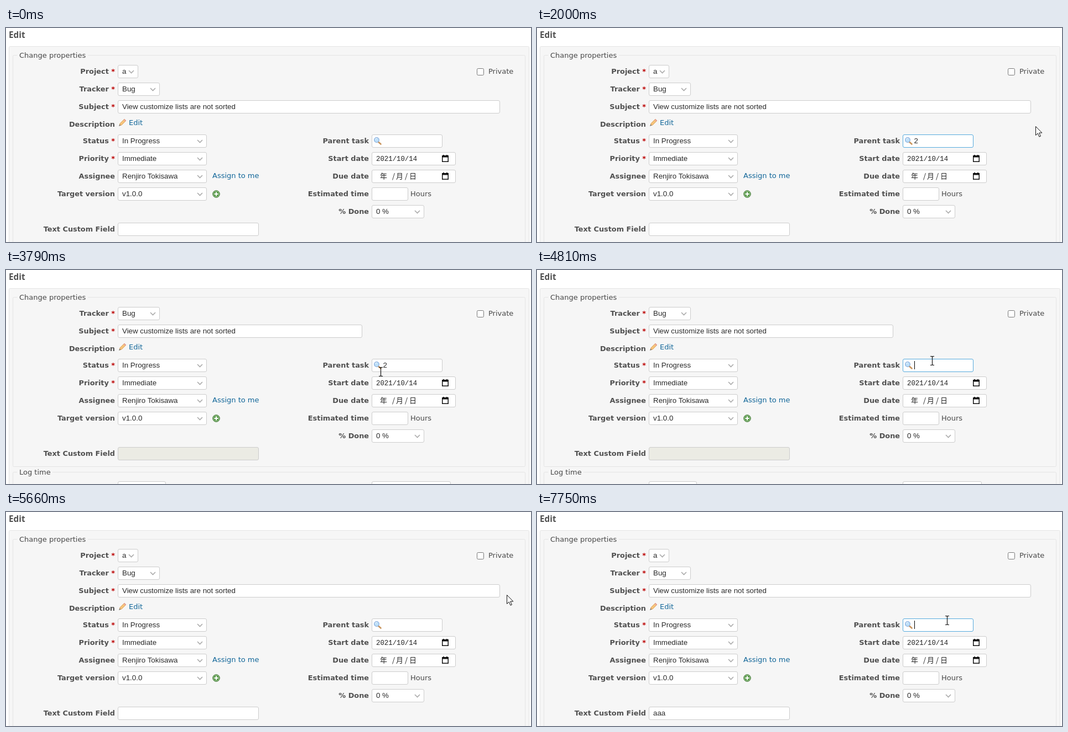
Recreate the animation shown at these times as an HTML page. Size 949 by 388 pixels, loop 8 s.

```html
<!DOCTYPE html>
<html lang="en">
<head>
<meta charset="utf-8">
<title>Edit form</title>
<style>
  html, body { margin: 0; width: 100%; height: 100%; overflow: hidden; background: #fff; }
  svg { display: block; }
  text { font: 13px "DejaVu Sans", sans-serif; fill: #484848; }
  .label { font-weight: bold; font-size: 12.85px; fill: #505050; }
  .end { text-anchor: end; }
  .req { fill: #b00; }
  .link { fill: #169; }
  .value { font: 13.33px "Liberation Sans", Arial, sans-serif; fill: #2b2b2b; }
  .date { font: 12.35px "Liberation Mono", monospace; fill: #222; }
  .kanji { font: 13px "Noto Sans CJK JP", "Noto Sans CJK", sans-serif; fill: #222; }
  .heading { font: bold 15.3px "Open Sans", sans-serif; fill: #505050; }
  .field { fill: #fff; stroke: #ccc; }
  .focus { stroke: #5ad; }
  .disabled { fill: #ebebe4; }
  .frame { fill: none; stroke: #e4e4e4; }
</style>
</head>
<body>
<svg id="stage" width="949" height="388" viewBox="0 0 949 388"></svg>
<script>
const TICK = 77.5, LOOP = 8000, SHIFT = 32;
const stage = document.getElementById('stage');

const text = (x, y, s, cls = '', id = '') => `<text id="${id}" x="${x}" y="${y}" class="${cls}">${s}</text>`;
const label = (right, y, s, required) =>
  text(right, y, s + (required ? ' <tspan class="req">*</tspan>' : ''), 'label end');
const field = (x, y, w, id = '') =>
  `<rect id="${id}" class="field" x="${x + .5}" y="${y + .5}" width="${w - 1}" height="23" rx="2.5"/>`;
const select = (x, y, w, value) => field(x, y, w) + text(x + 8, y + 16, value, 'value') +
  `<path d="M${x + w - 17} ${y + 10}l4.5 4.5 4.5-4.5" fill="none" stroke="#aaa" stroke-width="1.6"/>`;
const legend = (y, w, s) => `<rect x="20" y="${y - 8}" width="${w}" height="16" fill="#f6f6f6"/>` + text(24, y + 5, s);
const calendar = y => `<path d="M788.75 ${y + 7}h10.5v10.2h-10.5z" fill="none" stroke="#111" stroke-width="1.5"/>
  <path d="M788 ${y + 6}h12v3.5h-12zM790 ${y + 5}h2v2h-2zM796 ${y + 5}h2v2h-2z" fill="#111"/>`;

const pencil = `<path d="M205 177l1-4 8-8 3 3-8 8z" fill="#f6c47c" stroke="#d99a50" stroke-width=".8"/>
  <path d="M212.5 166.500l1.500-1.500 3 3-1.500 1.500z" fill="#e9a3a0"/><path d="M204 178l1.500-3.500 2 2z" fill="#777"/>`;
const plus = `<circle cx="380" cy="301" r="6.300" fill="#5a9a4c" stroke="#4c7c42"/>
  <circle cx="380" cy="301" r="5.200" fill="none" stroke="#a5cc98" stroke-width=".8"/>
  <path d="M376.500 301h7M380 297.500v7" stroke="#fff" stroke-width="2"/>`;
const lens = `<path d="M673 206.500l4.500 4" stroke="#c8945c" stroke-width="2.600" stroke-linecap="round"/>
  <circle cx="670" cy="203" r="4.300" fill="#bfe0f8" stroke="#88aede" stroke-width="1.300"/>
  <path d="M667.500 202a3 3 0 0 1 3-2" stroke="#fff" fill="none"/>`;
const spinner = Array.from({ length: 10 }, (_, i) =>
  `<path d="M575 220v-3.500" transform="rotate(${i * 36} 575 223)" stroke="#222" stroke-width="1.800" opacity="${1 - i * .08}"/>`).join('');

stage.innerHTML = `
  <rect x="5.5" y="33.5" width="940" height="400" rx="2" fill="#f6f6f6" stroke="#e4e4e4"/>
  ${text(5, 18, 'Edit', 'heading')}
  <rect id="properties" class="frame" x="12.5" y="49.5" width="926" rx="2"/>
  ${legend(49, 128, 'Change properties')}
  <rect x="851.5" y="73.500" width="12" height="12" rx="2" fill="#fff" stroke="#767676"/>
  ${text(872, 83, 'Private')}
  <g id="project">${label(197, 83, 'Project', true)}${select(202, 67, 37, 'a')}</g>
  <g id="rows">
    ${label(197, 115, 'Tracker', true)}${select(202, 99, 76, 'Bug')}
    ${label(197, 147, 'Subject', true)}${field(202, 131, 691, 'subject')}
    ${text(210, 147, 'View customize lists are not sorted', 'value')}
    ${label(197, 179, 'Description')}${pencil}${text(222, 176, 'Edit', 'link')}
    ${label(197, 209, 'Status', true)}${select(202, 193, 161, 'In Progress')}
    ${label(197, 241, 'Priority', true)}${select(202, 225, 161, 'Immediate')}
    ${label(197, 273, 'Assignee')}${select(202, 257, 161, 'Renjiro Tokisawa')}
    ${text(373, 272, 'Assign to me', 'link')}
    ${label(197, 305, 'Target version')}${select(202, 289, 161, 'v1.0.0')}${plus}
    ${label(197, 369, 'Text Custom Field')}${field(202, 353, 255, 'custom')}
    ${text(210, 369, '', 'value', 'customValue')}
    ${label(656, 209, 'Parent task')}${field(661, 193, 128, 'parent')}${lens}
    <rect id="selection" x="682" y="197" width="7.400" height="16" fill="#0078d7"/>
    ${text(681.5, 209, '', 'value', 'parentValue')}
    ${label(656, 241, 'Start date')}${field(661, 225, 152)}${text(669, 241, '2021/10/14', 'date')}${calendar(225)}
    ${label(656, 273, 'Due date')}${field(661, 257, 152)}${calendar(257)}
    ${[[676, '年'], [698, '/'], [705, '月'], [721, '/'], [729, '日']].map(([x, s]) => text(x, 273, s, 'kanji')).join('')}
    ${label(656, 305, 'Estimated time')}${field(661, 289, 66)}${text(731, 305, 'Hours')}
    ${label(656, 337, '% Done')}${select(661, 321, 95, '0 %')}
    <path id="caret" stroke="#000"/>
  </g>
  <g id="logTime">
    <rect class="frame" x="12.5" y="366.5" width="926" height="60" rx="2"/>
    ${legend(366, 64, 'Log time')}${field(202, 383, 87)}${field(661, 383, 143)}
  </g>
  <g id="loading" opacity=".5">
    <rect x="486.5" y="207.5" width="264" height="31" fill="#eee" stroke="#bbb"/>
    ${spinner}${text(595, 228, 'Loading...', 'label')}
  </g>
  <path id="arrow" d="M.5.5v16l3.700-3.500 2.700 6.200 2.500-1.100-2.700-6H11.800z" fill="#fff" stroke="#111"/>
  <path id="beam" d="M-3.500-8h2.500l1 1 1-1h2.500M0-7V7M-3.500 8h2.500l1-1 1 1h2.500" fill="none" stroke="#111" stroke-width="1.200"/>`;

const el = Object.fromEntries([...stage.querySelectorAll('[id]')].filter(e => e.id).map(e => [e.id, e]));
const show = (e, on) => e.style.display = on ? '' : 'none';

// Pointer waypoints: tick, x, y
const path = [
  [2, 849, 375], [11, 726, 203], [20, 726, 203], [26, 901, 178], [33, 901, 178], [36, 456, 295],
  [40, 388, 331], [46, 388, 331], [50, 773, 135], [51, 773, 135], [54, 730, 178], [56, 730, 178],
  [60, 610, 182], [62, 714, 164], [67, 904, 150], [68, 905, 150], [74, 905, 150], [82, 410, 354],
  [84, 404, 359], [92, 404, 359], [98, 741, 196], [110, 741, 196]
];

function pointerAt(tick) {
  const i = Math.max(1, path.findIndex(p => p[0] >= tick));
  const [t0, x0, y0] = path[i - 1], [t1, x1, y1] = path[i];
  const k = (tick - t0) / (t1 - t0);
  return [x0 + (x1 - x0) * k, y0 + (y1 - y0) * k].map(Math.round);
}

function draw(time) {
  const tick = Math.floor(time / TICK + .25);
  const within = (a, b) => tick >= a && tick < b;
  const compact = within(31, 73), dy = compact ? -SHIFT : 0;

  show(el.project, !compact);
  show(el.logTime, compact);
  show(el.loading, tick === 30 || tick === 72);
  el.rows.setAttribute('transform', `translate(0 ${dy})`);
  el.subject.setAttribute('width', compact ? 441 : 690);
  el.properties.setAttribute('height', compact ? 307 : 400);
  el.custom.classList.toggle('disabled', compact);

  const inParent = within(13, 30) || within(57, 72) || tick >= 100;
  const inCustom = within(86, 100);
  const selected = within(58, 61);
  el.parent.classList.toggle('focus', inParent);
  el.custom.classList.toggle('focus', inCustom);
  el.parentValue.textContent = within(19, 61) ? '2' : '';
  el.parentValue.style.fill = selected ? '#fff' : '';
  show(el.selection, selected);
  const typed = [90, 91, 93].filter(t => tick >= t).length;
  el.customValue.textContent = 'a'.repeat(typed);

  const blinkOff = within(26, 30) || within(68, 72);
  show(el.caret, (inParent || inCustom) && !selected && !blinkOff);
  el.caret.setAttribute('d', inCustom
    ? `M${Math.round(210 + typed * 7.4) + .5} 357v15`
    : `M${within(19, 61) ? 689.5 : 682.5} 197v15`);

  const [x, y] = pointerAt(tick);
  const over = (left, top, w) => x >= left && x <= left + w && y >= top + dy && y <= top + dy + 24;
  const beam = over(661, 193, 128) || (!compact && over(202, 353, 255)) || within(57, 62);
  show(el.arrow, tick >= 2 && !beam);
  show(el.beam, tick >= 2 && beam);
  el.arrow.setAttribute('transform', `translate(${x} ${y})`);
  el.beam.setAttribute('transform', `translate(${x + .5} ${y + .5})`);
}

function loop() {
  draw(performance.now() % LOOP);
  requestAnimationFrame(loop);
}
loop();
</script>
</body>
</html>
```
